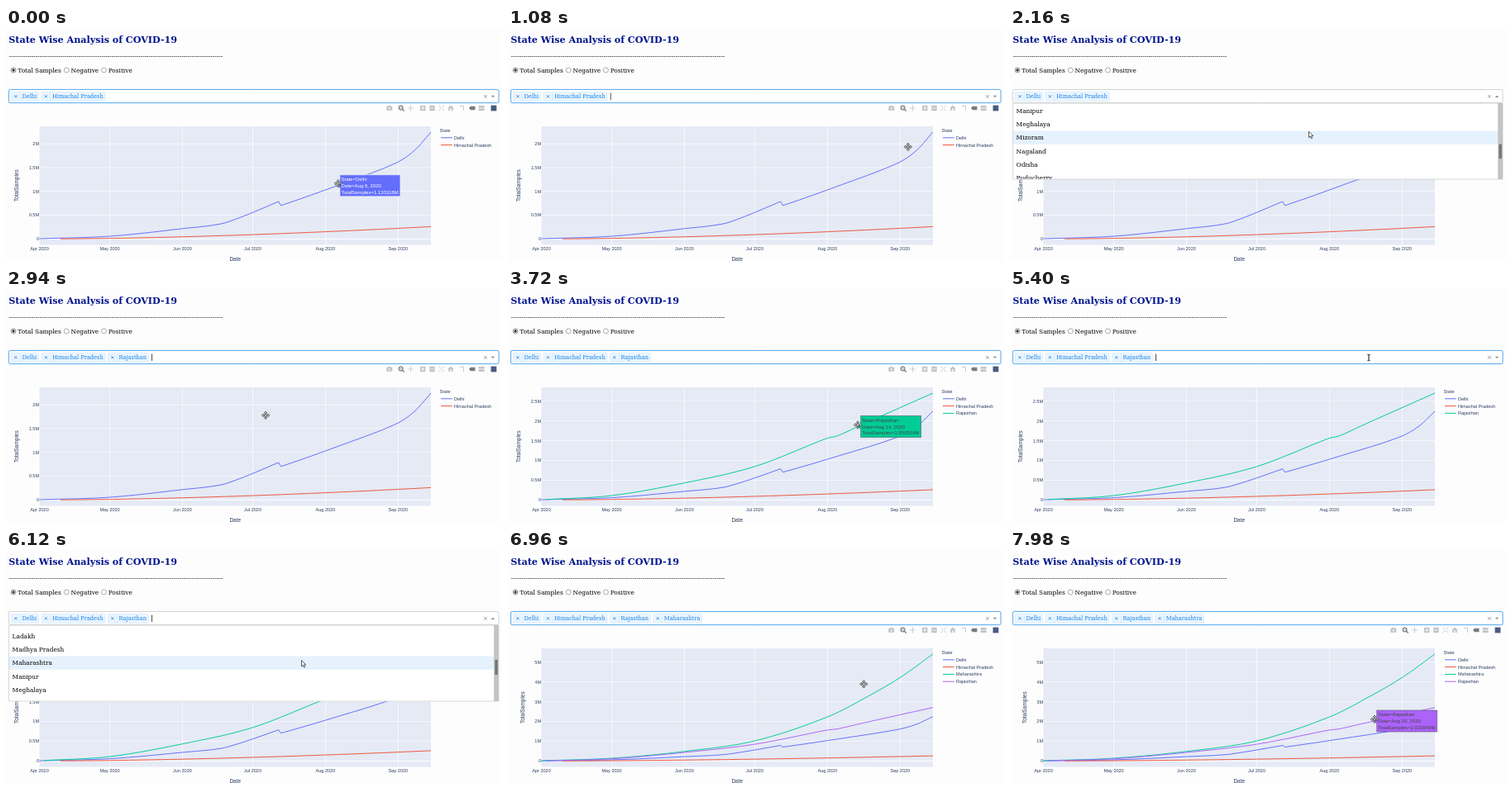
An HTML page with a canvas for the animation above (8 s loop, 600 by 282 pixels).

```html
<!DOCTYPE html>
<html lang="en">
<head>
<meta charset="utf-8">
<title>State Wise Analysis</title>
<style>
html, body { margin: 0; width: 100%; height: 100%; overflow: hidden; background: #fefdfe; }
canvas { display: block; width: 600px; height: 282px; }
</style>
</head>
<body>
<canvas id="stage"></canvas>
<script>
const W = 600, H = 282, LOOP = 8000, K = 0.46;
const SERIF = '"DejaVu Serif", serif';
const SANS = '"Liberation Sans", Arial, sans-serif';
const INK = '#2a3f5f', BLUE = '#636efa', RED = '#ef553b', GREEN = '#00cc96', PURPLE = '#ab63fa';
const DAYS = 167;
const PLOT = { x: 40.5, y: 119, r: 514, b: 262.5, zero: 255.3 };
const DAY = (PLOT.r - PLOT.x) / DAYS;
const MENU = { x: 3.5, y: 91, w: 592.5, h: 92, row: 16.25 };

const canvas = document.getElementById('stage');
const ctx = canvas.getContext('2d');
const dpr = window.devicePixelRatio || 1;
canvas.width = W * dpr;
canvas.height = H * dpr;

const clamp = v => Math.min(1, Math.max(0, v));
const ease = v => { v = clamp(v); return v * v * (3 - 2 * v); };
const within = ([a, b], t) => t >= a && t < b;

// Straight moves between [t, x, y] stops
function travel(path, t) {
  const i = Math.max(1, path.findIndex(p => p[0] >= t));
  const a = path[i - 1], b = path[i], p = clamp((t - a[0]) / (b[0] - a[0]));
  return [1, 2].map(j => a[j] + (b[j] - a[j]) * p);
}

// Cubic curve through a few [day, value] knots
function smooth(knots) {
  const slope = i => {
    const a = knots[Math.max(0, i - 1)], b = knots[Math.min(knots.length - 1, i + 1)];
    return (b[1] - a[1]) / (b[0] - a[0]);
  };
  return d => {
    const i = Math.max(1, knots.findIndex(k => k[0] >= d));
    const [x0, y0] = knots[i - 1], [x1, y1] = knots[i], w = x1 - x0, p = clamp((d - x0) / w);
    const q = 1 - p;
    return q * q * ((1 + 2 * p) * y0 + p * w * slope(i - 1)) + p * p * ((3 - 2 * p) * y1 - q * w * slope(i));
  };
}

// Cumulative samples in millions, by days since 1 April
const delhiTrend = smooth([[0, .005], [30, .057], [61, .217], [79, .335], [103, .703],
  [127, 1.120318], [152, 1.594], [160, 1.86], [167, 2.245]]);
const samples = {
  'Delhi': { first: 0, at: d => delhiTrend(d) + (d < 103 ? 0.1 * clamp((d - 79) / 23) : 0) },
  'Himachal Pradesh': { first: 9, at: d => 0.003 + 0.256 * Math.pow(Math.max(0, d - 9) / 158, 1.63) },
  'Rajasthan': { first: 2, at: smooth([[2, .01], [30, .111], [61, .431], [91, .847], [122, 1.565],
    [126, 1.617], [135, 1.858534], [141, 2.020946], [167, 2.705]]) },
  'Maharashtra': { first: 0, at: smooth([[0, .01], [30, .138], [61, .481], [91, 1.017], [122, 2.23],
    [140, 3.318], [154, 4.301], [167, 5.418]]) }
};
const states = ['Andaman and Nicobar Islands', 'Andhra Pradesh', 'Arunachal Pradesh', 'Assam', 'Bihar',
  'Chandigarh', 'Chhattisgarh', 'Dadra and Nagar Haveli', 'Goa', 'Gujarat', 'Haryana',
  'Jammu and Kashmir', 'Jharkhand', 'Karnataka', 'Kerala', 'Ladakh', 'Madhya Pradesh', 'Maharashtra',
  'Manipur', 'Meghalaya', 'Mizoram', 'Nagaland', 'Odisha', 'Puducherry', 'Punjab', 'Rajasthan',
  'Sikkim', 'Tamil Nadu', 'Telangana', 'Tripura', 'Uttar Pradesh', 'Uttarakhand', 'West Bengal'];

const pair = { 'Delhi': BLUE, 'Himachal Pradesh': RED };
const charts = [
  { from: 0, unit: 57.6, step: 0.5, colors: pair },
  { from: 2980, unit: 47.8, step: 0.5, colors: { ...pair, 'Rajasthan': GREEN } },
  { from: 6880, unit: 23.9, step: 1, colors: { ...pair, 'Maharashtra': GREEN, 'Rajasthan': PURPLE } }
];
const picks = [['Delhi', 0], ['Himachal Pradesh', 0], ['Rajasthan', 2800], ['Maharashtra', 6360]];
const menus = [[1760, 2800], [5600, 6360]];
const hovers = [[0, 300, 'Delhi'], [380, 680, 'Himachal Pradesh'], [790, 900, 'Delhi'],
  [3400, 4240, 'Rajasthan'], [7540, LOOP, 'Rajasthan']];
const cursorPath = [[0, 402, 187], [380, 345, 246], [680, 465, 243], [790, 469, 165], [1080, 484, 144],
  [1650, 444, 82], [2160, 361.5, 125.2], [2800, 361.5, 125.2], [3400, 160, 243], [3720, 423, 164],
  [4200, 461, 147], [4740, 434, 83], [5600, 434, 83], [6060, 357.5, 133.5], [6360, 357.5, 133.5],
  [7560, 503, 191], [7980, 441, 206], [LOOP, 441, 206]];

const dayX = d => PLOT.x + d * DAY;
const dayAt = x => Math.round((x - PLOT.x) / DAY);
const valueY = (chart, v) => PLOT.zero - v * chart.unit;

function menuScroll(t) {
  return t < 4000
    ? 291.5 * ease((t - 1860) / 280) + 93.5 * ease((t - 2200) / 280)
    : 238.75 * ease((t - 5720) / 340);
}

function text(s, x, y, px, color, font = SERIF, align = 'left', weight = '') {
  ctx.save();
  ctx.translate(x, y);
  ctx.scale(K, K);
  ctx.font = `${weight} ${px}px ${font}`;
  ctx.fillStyle = color;
  ctx.textAlign = align;
  ctx.fillText(s, 0, 0);
  ctx.restore();
}

function textWidth(s, px, font) {
  ctx.font = `${px}px ${font}`;
  return ctx.measureText(s).width * K;
}

function rect(x, y, w, h, color) {
  ctx.fillStyle = color;
  ctx.fillRect(x, y, w, h);
}

function paint(fill, stroke, width) {
  if (fill) { ctx.fillStyle = fill; ctx.fill(); }
  if (stroke) { ctx.strokeStyle = stroke; ctx.lineWidth = width; ctx.stroke(); }
}

function box(x, y, w, h, r, fill, stroke, width) {
  ctx.beginPath();
  ctx.roundRect(x, y, w, h, r);
  paint(fill, stroke, width);
}

function circle(x, y, r, fill, stroke, width) {
  ctx.beginPath();
  ctx.arc(x, y, r, 0, Math.PI * 2);
  paint(fill, stroke, width);
}

function poly(points, stroke, width, fill) {
  ctx.beginPath();
  points.forEach(([x, y]) => ctx.lineTo(x, y));
  if (fill) ctx.closePath();
  paint(fill, stroke, width);
}

function cross(x, y, r, color, width) {
  for (const s of [-1, 1]) poly([[x - r, y - r * s], [x + r, y + r * s]], color, width);
}

function drawHeader() {
  text('State Wise Analysis of COVID-19', 3.3, 17.6, 24.2, '#00148c', SERIF, 'left', 'bold');
  text('-'.repeat(104), 3.5, 36.9, 16, '#000');
  [['Total Samples', 9], ['Negative', 73.2], ['Positive', 118.4]].forEach(([label, x], i) => {
    circle(x, 51, 3, '#fff', i ? '#8a8a8a' : '#666', 0.7);
    if (!i) circle(x, 51, 1.7, '#333');
    text(label, x + 5.3, 54.3, 16, '#000');
  });
}

function drawChart(chart) {
  const { unit, step, colors } = chart;
  const w = PLOT.r - PLOT.x, h = PLOT.b - PLOT.y;
  rect(PLOT.x, PLOT.y, w, h, '#e5eaf5');
  for (let m = 3; m < 9; m++) {
    const date = new Date(Date.UTC(2020, m, 1));
    const x = dayX((date - Date.UTC(2020, 3, 1)) / 864e5);
    if (m > 3) rect(x - 0.3, PLOT.y, 0.6, h, '#fff');
    text(date.toLocaleDateString('en-US', { month: 'short', timeZone: 'UTC' }) + ' 2020',
      x, 268.6, 12, INK, SANS, 'center');
  }
  for (let v = 0; v * unit < PLOT.zero - PLOT.y; v += step) {
    const y = valueY(chart, v), thick = v ? 0.6 : 1;
    rect(PLOT.x, y - thick / 2, w, thick, '#fff');
    text(v ? v + 'M' : '0', 40, y + 1.9, 12, INK, SANS, 'right');
  }
  text('Date', 277.2, 282, 14, INK, SANS, 'center');
  ctx.save();
  ctx.translate(27.6 - textWidth(step + 'M', 12, SANS), 190.7);
  ctx.rotate(-Math.PI / 2);
  text('TotalSamples', 0, 0, 14, INK, SANS, 'center');
  ctx.restore();

  text('State', 524.6, 126.4, 12, INK, SANS);
  ctx.lineJoin = 'round';
  Object.entries(colors).forEach(([name, color], i) => {
    const { first, at } = samples[name], points = [];
    for (let d = first; d <= DAYS; d++) points.push([dayX(d), valueY(chart, at(d))]);
    poly(points, color, 1);
    const y = 132.8 + i * 8.8;
    poly([[526, y], [539.8, y]], color, 1);
    text(name, 542, y + 2, 12, INK, SANS);
  });
}

function drawModebar() {
  const y = 97, dim = '#c3c3c5', dark = '#7b7b7d';
  rect(460.3, y - 2.2, 7, 5, dim);
  rect(462.3, y - 3.1, 3, 1.2, dim);
  circle(463.8, y + 0.3, 1.1, null, '#fefdfe', 0.7);

  circle(477.6, y - 0.5, 2.4, null, dark, 1.2);
  poly([[479.4, y + 1.3], [481.8, y + 3.5]], dark, 1.4);
  rect(476.5, y - 0.8, 2.2, 0.7, dark);

  rect(485.8, y - 0.4, 7.2, 0.8, dim);
  rect(489, y - 3.6, 0.8, 7.2, dim);

  [504.2, 515.5].forEach((x, i) => {
    rect(x - 3.2, y - 3.2, 6.4, 6.4, dim);
    rect(x - 2, y - 0.45, 4, 0.9, '#fff');
    if (!i) rect(x - 0.45, y - 2, 0.9, 4, '#fff');
  });
  cross(526.8, y, 3.2, dim, 0.9);
  circle(526.8, y, 0.9, '#fefdfe');
  poly([[534.2, y], [538, y - 3.4], [541.8, y]], null, 0, dim);
  rect(535.3, y, 2, 3, dim);
  rect(538.7, y, 2, 3, dim);
  poly([[549, y - 2.6], [553.5, y - 2.6], [553.5, y + 3]], dim, 0.9);
  poly([[560, y], [562, y - 2.2], [567.5, y - 2.2], [567.5, y + 2.2], [562, y + 2.2]], null, 0, dark);
  rect(571.7, y - 3, 7, 2.6, dim);
  rect(571.7, y + 0.4, 7, 2.6, dim);
  rect(586.6, y - 3.4, 6.8, 6.8, '#4b5b82');
}

function drawHover(chart, name, cursorX) {
  const color = chart.colors[name], day = dayAt(cursorX), v = samples[name].at(day);
  const x = dayX(day), y = valueY(chart, v);
  const date = new Date(Date.UTC(2020, 3, 1 + day))
    .toLocaleDateString('en-US', { month: 'short', day: 'numeric', year: 'numeric', timeZone: 'UTC' });
  const value = v < 1 ? (v * 1000).toFixed(3) + 'k' : v.toFixed(6) + 'M';
  const lines = ['State=' + name, 'Date=' + date, 'TotalSamples=' + value];
  const w = Math.max(...lines.map(s => textWidth(s, 13, SANS))) + 3.6;
  const ink = color === BLUE ? '#fff' : '#444';
  const l = x + 3.4, r = l + w, top = y - 13, bottom = y + 13;
  poly([[x, y], [l, y - 2.8], [l, top], [r, top], [r, bottom], [l, bottom], [l, y + 2.8]], ink, 0.5, color);
  lines.forEach((s, i) => text(s, l + 1.5, y - 5.6 + i * 7.8, 13, ink, SANS));
}

function drawSelect(t, open) {
  if (!open) box(3, 74, 593.5, 17, 2.3, null, 'rgba(0,126,255,.15)', 1.2);
  box(3.5, 74.5, 592.5, 16, 1.8, '#fff', open ? '#c8c8c8' : '#3fa0e8', 0.8);
  let x = 6.5;
  for (const [name, from] of picks) {
    if (t < from) continue;
    const w = textWidth(name, 14.4, SERIF);
    box(x, 77.4, w + 15.2, 11, 0.9, '#ebf5ff', '#c2e0ff', 0.5);
    rect(x + 10.4, 77.4, 0.5, 11, '#c2e0ff');
    cross(x + 5.3, 82.8, 1.6, '#1080e8', 0.8);
    text(name, x + 13, 85.2, 14.4, '#1080e8');
    x += w + 18.8;
  }
  const blink = t >= 1640 && t < 3000 ? 1640 : 50;
  if ((t - blink + LOOP) % 1000 < 500) rect(x + 0.3, 78.6, 0.8, 8.4, '#222');
  cross(580, 82.8, 1.9, '#999', 0.9);
  const tip = open ? -1.2 : 1.2;
  poly([[586.8, 82.9 - tip], [591.2, 82.9 - tip], [589, 82.9 + tip]], null, 0, '#888');
}

function drawMenu(t, cursorY) {
  const { x, y, w, h, row } = MENU;
  const items = states.filter(s => !picks.some(([n, from]) => n === s && t >= from));
  const scroll = menuScroll(t), full = items.length * row;
  ctx.save();
  ctx.beginPath();
  ctx.rect(x, y, w, h);
  ctx.clip();
  rect(x, y, w, h, '#fff');
  items.forEach((name, i) => {
    const top = y + i * row - scroll;
    if (cursorY >= top && cursorY < top + row) rect(x, top, w, row, '#e5f1fc');
    text(name, 7.6, top + 10.8, 16, '#000');
  });
  rect(590.2, y, 5.8, h, '#c3c3c3');
  box(591.4, y + scroll / full * h - 0.5, 3.4, h * h / full + 2, 1, '#757575');
  ctx.restore();
  box(x, y, w, h, 0, null, '#c8c8c8', 0.7);
}

function drawCursor(x, y, open) {
  const ink = '#333';
  ctx.save();
  ctx.translate(x, y);
  if (!open && y > 74 && y < MENU.y) {
    rect(-0.6, -3.6, 1.2, 7.2, ink);
    for (const end of [-4, 3.2]) rect(-1.7, end, 3.4, 0.9, ink);
  } else if (!open && y > PLOT.y && y < PLOT.b) {
    for (let i = 0; i < 4; i++) {
      ctx.rotate(Math.PI / 2);
      poly([[-0.8, -1.5], [-0.8, -3], [-1.7, -3], [0, -4.8], [1.7, -3], [0.8, -3], [0.8, -1.5]], ink, 0.7, '#ddd');
    }
    circle(0, 0, 1.2, '#eee', ink, 0.5);
  } else {
    poly([[0, 0], [0, 7.4], [1.7, 5.9], [3, 8.6], [4.2, 8], [3, 5.4], [5.3, 5.3]], ink, 0.8, '#fff');
  }
  ctx.restore();
}

function draw(t) {
  ctx.setTransform(dpr, 0, 0, dpr, 0, 0);
  rect(0, 0, W, H, '#fefdfe');
  const open = menus.some(m => within(m, t));
  const chart = charts.filter(c => t >= c.from).pop();
  const hover = hovers.find(h => within(h, t));
  let [x, y] = travel(cursorPath, t);
  // A hovering pointer rides just above its line
  if (hover) y = valueY(chart, samples[hover[2]].at((x - PLOT.x) / DAY)) - 2;

  drawHeader();
  drawChart(chart);
  if (!open && y > MENU.y) drawModebar();
  if (hover) drawHover(chart, hover[2], x);
  drawSelect(t, open);
  if (open) drawMenu(t, y);
  drawCursor(x, y, open);
}

const begin = performance.now();
function tick() {
  draw((performance.now() - begin) % LOOP);
  requestAnimationFrame(tick);
}
tick();
</script>
</body>
</html>
```
